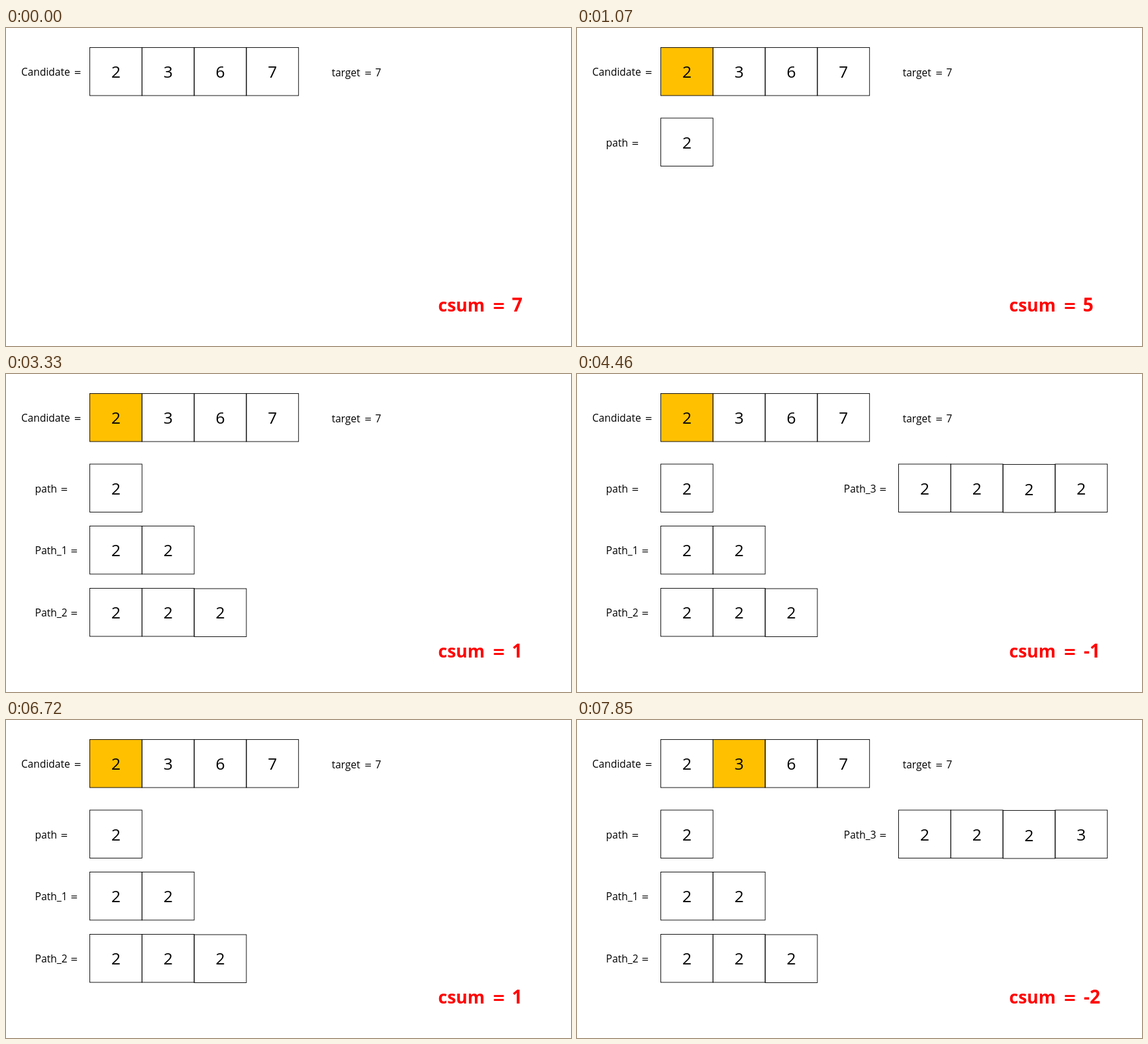
An HTML page with a canvas for the animation above (8 s loop, 853 by 480 pixels).

```html
<!DOCTYPE html>
<html lang="en">
<head>
<meta charset="utf-8">
<title>Combination sum</title>
<style>
html, body { margin: 0; width: 100%; height: 100%; overflow: hidden; background: #fff; }
canvas { display: block; }
</style>
</head>
<body>
<canvas id="stage" width="853" height="480"></canvas>
<script>
const ctx = document.getElementById('stage').getContext('2d');
const LOOP = 8000;
const CELL_W = 78.8, CELL_H = 72.5;
const ORANGE = '#ffc000', RED = '#ff0000';
const SANS = '"Open Sans", "Noto Sans", sans-serif';
const WIDE = '"DejaVu Sans", sans-serif';

// Each step: start time, remaining sum, visible path rows, marked candidate, last path
const STEPS = [
  { at: 0, sum: '7', rows: 0, pick: -1 },
  { at: 1070, sum: '5', rows: 1, pick: 0 },
  { at: 2200, sum: '3', rows: 2, pick: 0 },
  { at: 3330, sum: '1', rows: 3, pick: 0 },
  { at: 4460, sum: '-1', rows: 3, pick: 0, last: '2222' },
  { at: 5590, sum: '-1', rows: 3, pick: 0, last: '2222', over: true },
  { at: 6720, sum: '1', rows: 3, pick: 0 },
  { at: 7850, sum: '-2', rows: 3, pick: 1, last: '2223' }
];

const PATHS = [
  { name: 'path', eq: 83.7, y: 136, base: 179 },
  { name: 'Path_1', eq: 98.7, y: 229.5, base: 272 },
  { name: 'Path_2', eq: 98.7, y: 323.5, base: 366 }
];

function text(str, x, y, font, color = '#000', align = 'left') {
  ctx.font = font;
  ctx.fillStyle = color;
  ctx.textAlign = align;
  ctx.fillText(str, x, y);
}

function label(str, x, y) {
  text(str, x, y, '15.5px ' + SANS);
}

// x is the left edge of the visible bars
function equals(x, y) {
  text('=', x - 1.4, y, '13.5px ' + WIDE);
}

// The third cell of a path sits slightly lower than its neighbours
function cells(x, y, digits, fillOf = () => null, dip = 0, digitDip = 0) {
  [...digits].forEach((digit, i) => {
    const left = x + i * CELL_W;
    const low = i === 2 ? 1 : 0;
    const top = y + low * dip;
    const fill = fillOf(i);
    if (fill) {
      ctx.fillStyle = fill;
      ctx.fillRect(left, top, CELL_W, CELL_H);
    }
    ctx.strokeStyle = '#000';
    ctx.lineWidth = 0.9;
    ctx.strokeRect(left, top, CELL_W, CELL_H);
    text(digit, left + CELL_W / 2, Math.floor(y) + 46 + low * digitDip,
      '24.5px ' + SANS, '#000', 'center');
  });
}

function draw(time) {
  const step = STEPS.findLast(s => s.at <= time);
  ctx.fillStyle = '#fff';
  ctx.fillRect(0, 0, 853, 480);

  label('Candidate', 23, 72);
  equals(103.8, 72);
  cells(126.5, 29.5, '2367', i => i === step.pick ? ORANGE : null);

  label('target', 491.7, 73);
  equals(542.5, 73);
  label('7', 557.5, 73);

  PATHS.slice(0, step.rows).forEach((row, i) => {
    label(row.name, 43.8, row.base);
    equals(row.eq, row.base);
    cells(126.5, row.y, '2'.repeat(i + 1), undefined, 0.5);
  });

  if (step.last) {
    label('Path_3', 402.8, 179);
    equals(457.7, 179);
    cells(485.5, 136, step.last, () => step.over ? RED : null, 0.5, 1);
  }

  const bold = 'bold 28px ' + SANS;
  text('csum', 652.5, 428, 'bold 26.5px ' + SANS, RED);
  text('=', 734, 428, 'bold 24px ' + WIDE, RED);
  text(step.sum, step.sum.length > 1 ? 765 : 763.8, 428, bold, RED);
}

const start = performance.now();
function tick() {
  draw((performance.now() - start) % LOOP);
  requestAnimationFrame(tick);
}
tick();
</script>
</body>
</html>
```
